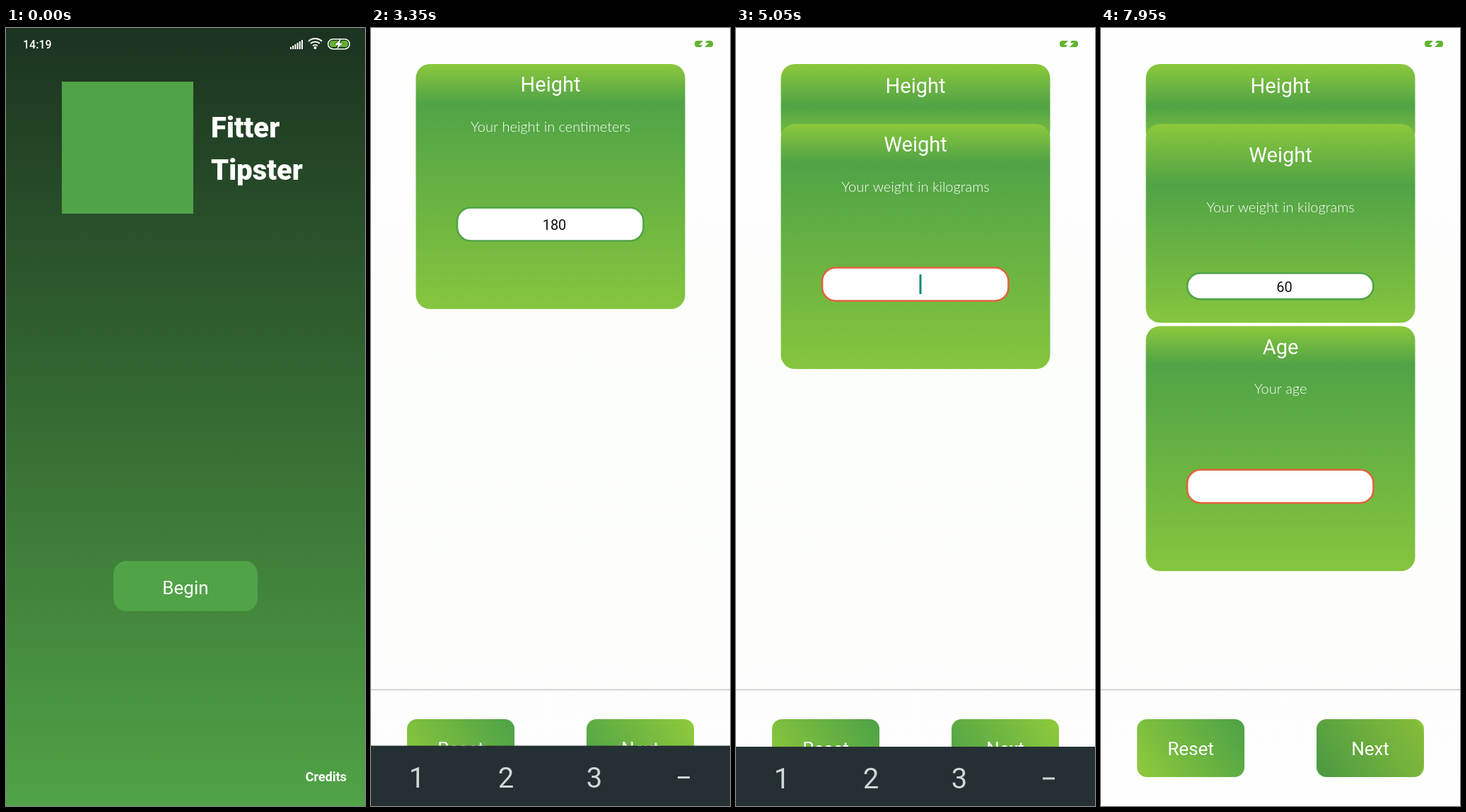
These frames come from a looping animation (508 by 1102 pixels, 8 s). An HTML page with a canvas:

```html
<!DOCTYPE html>
<html lang="en">
<head>
<meta charset="utf-8">
<title>Body data form</title>
<style>
  html, body { margin: 0; width: 508px; height: 1102px; overflow: hidden; background: #fff; }
  canvas { display: block; }
</style>
</head>
<body>
<canvas id="stage" width="508" height="1102"></canvas>
<script>
const W = 508, H = 1102, LOOP = 8000;
const LIME = '#8cc83c', GREEN = '#50a346', ORANGE = '#e0633c', KEY = '#cfd8d6';
const c = document.getElementById('stage').getContext('2d');

const clamp = x => Math.max(0, Math.min(1, x));
const lerp = (a, b, p) => a + (b - a) * p;
const easeOut = x => 1 - (1 - x) ** 2;
const phase = (t, start, length) => easeOut(clamp((t - start) / length));

// Release time and place of each tap
const BEGIN = 230, NEXT_1 = 3865, NEXT_2 = 7760;
const TAPS = [
  [BEGIN, 240, 795], [1680, 256, 280], [2300, 56, 855], [2580, 200, 998],
  [2860, 206, 1060], [3150, 440, 1062], [NEXT_1, 388, 1021], [4900, 256, 366],
  [6150, 318, 928], [6560, 208, 1058], [6950, 440, 1062], [NEXT_2, 374, 1021]
];
// Typed digits: time, column, row
const STROKES = [[2300, 0, 0], [2580, 1, 2], [2860, 1, 3], [6150, 2, 1], [6560, 1, 3]];
const COLS = [65, 191, 316, 442], ROWS = [855, 926, 997, 1068];
const FOCUS = [{ from: 1750, to: 3250 }, { from: 4950, to: 7050 }];

function box(x, y, w, h, r, fill) {
  c.beginPath();
  c.roundRect(x, y, w, h, r);
  c.fillStyle = fill;
  c.fill();
}

function line(points, width, color, close) {
  c.beginPath();
  points.forEach(([x, y]) => c.lineTo(x, y));
  if (close) c.closePath();
  c.lineWidth = width;
  c.strokeStyle = color;
  c.stroke();
}

function shape(points, color) {
  c.beginPath();
  points.forEach(([x, y]) => c.lineTo(x, y));
  c.fillStyle = color;
  c.fill();
}

// y is the middle of the capital letters
function label(s, x, y, size, { font = 'Roboto', weight = 400, color = '#fff', align = 'center' } = {}) {
  c.font = `${weight} ${size}px ${font}, sans-serif`;
  c.textAlign = align;
  c.fillStyle = color;
  c.fillText(s, x, y + size * 0.355);
}

function gradient(x0, y0, x1, y1, ...stops) {
  const g = c.createLinearGradient(x0, y0, x1, y1);
  stops.forEach(([at, color]) => g.addColorStop(at, color));
  return g;
}

function ripple(age, x, y) {
  if (age < 0 || age > 220) return;
  c.save();
  c.clip();
  c.beginPath();
  c.arc(x, y, lerp(20, 90, age / 220), 0, 7);
  c.fillStyle = `rgba(50,60,30,${0.34 * clamp((220 - age) / 120)})`;
  c.fill();
  c.restore();
}

function landing(t) {
  c.fillStyle = gradient(0, 0, 0, H, [0, '#1b3320'], [1, GREEN]);
  c.fillRect(0, 0, W, H);
  c.fillStyle = GREEN;
  c.fillRect(79, 76, 186, 187);
  label('Fitter', 290, 141, 40, { weight: 900, align: 'left' });
  label('Tipster', 290, 201, 40, { weight: 900, align: 'left' });
  box(152, 755, 204, 71, 18, GREEN);
  ripple(t - BEGIN, 254, 791);
  label('Begin', 254, 793, 26);
  label('Credits', 482, 1061, 18, { weight: 700, align: 'right' });
}

function statusBar() {
  label('14:19', 24, 23, 16, { weight: 500, align: 'left' });
  c.fillStyle = '#fff';
  for (let i = 0; i < 6; i++) c.fillRect(402 + i * 3.2, 27 - i * 2, 2, 3 + i * 2);
  c.strokeStyle = '#fff';
  c.lineWidth = 2;
  for (const r of [5, 9.5, 14]) {
    c.beginPath();
    c.arc(437.5, 29, r, -2.32, -0.82);
    c.stroke();
  }
  c.beginPath();
  c.arc(437.5, 28, 2, 0, 7);
  c.fill();
  c.lineWidth = 1.5;
  c.beginPath();
  c.roundRect(455.7, 15.7, 30.6, 14, 7);
  c.stroke();
  c.save();
  c.beginPath();
  c.roundRect(458, 18, 26, 9, 4);
  c.clip();
  shape([[458, 18], [470, 18], [464, 24], [469, 24], [467, 27], [458, 27]], '#62b42f');
  shape([[484, 27], [472, 27], [478, 21], [473, 21], [475, 18], [484, 18]], '#62b42f');
  c.restore();
  shape([[474, 15], [465, 24], [470, 24], [468, 30], [477, 21.5], [472, 21.5]], '#fff');
}

// p folds a card: 0 is open, 1 is tucked under the next one
function card(top, p, title, hint, value, valid, caret) {
  const bump = Math.sin(Math.PI * p);
  const h = lerp(347, 116, p);
  const dark = lerp(55, 60, p) + 38 * bump;
  const mid = top + lerp(227, 105, p) + 48 * bump;
  const fieldH = 47 - 35.6 * p;
  box(63.5, top, 381, h, 20,
    gradient(0, top, 0, top + h, [0, LIME], [clamp(dark / h), GREEN], [1, '#86c53e']));
  c.save();
  c.clip();
  label(title, 254, top + lerp(29, 31, p) + 18.7 * bump, 29);
  label(hint, 254, top + lerp(89, 93, p) + 36 * bump, 20, { font: 'Lato, Carlito', weight: 300 });
  box(122, mid - fieldH / 2, 263.5, fieldH, Math.min(19, fieldH / 2), '#fff');
  c.lineWidth = 2.6;
  c.strokeStyle = valid ? GREEN : ORANGE;
  c.stroke();
  label(value, 259.5, mid + 1, 20, { color: '#111' });
  if (caret) {
    c.fillStyle = '#0f8a75';
    c.fillRect(259.5 + c.measureText(value).width / 2, mid - 14, 3, 28);
  }
  c.restore();
}

function button(x, name, from, to, age) {
  box(x, 979, 152, 82, 14, gradient(x + 10, 1061, x + 142, 979, [0, from], [1, to]));
  ripple(age, x + 74, 1021);
  label(name, x + 76, 1021, 26);
}

function caretOn(t, { from, to }) {
  if (t < from || t > to) return false;
  const last = Math.max(from, ...STROKES.map(s => s[0]).filter(s => s <= t));
  return (t - last) % 1000 < 500;
}

function form(t) {
  c.fillStyle = gradient(0, 0, 0, H, [0, '#fefefe'], [0.5, '#fcfefb'], [1, '#fdfefd']);
  c.fillRect(0, 0, W, H);
  const typed = (s, times) => s.slice(0, times.filter(x => t >= x).length);
  const height = typed('180', [2300, 2580, 2860]);
  const weight = typed('60', [6150, 6560]);
  const fold1 = phase(t, NEXT_1 + 100, 592), fold2 = phase(t, NEXT_2 + 100, 592);
  const top2 = 51 + lerp(366, 85, fold1), top3 = top2 + lerp(366, 85, fold2);

  card(51, fold1, 'Height', 'Your height in centimeters', height, height.length > 1, caretOn(t, FOCUS[0]));
  if (t >= NEXT_1 + 50)
    card(top2, fold2, 'Weight', 'Your weight in kilograms', weight, weight, caretOn(t, FOCUS[1]));
  if (t >= NEXT_2 + 50) card(top3, 0, 'Age', 'Your age', '', false, false);

  c.fillStyle = '#c6cac6';
  c.fillRect(0, 936.5, W, 1.6);
  button(51, 'Reset', LIME, GREEN, -1);
  button(305, 'Next', GREEN, LIME, t - (t < 6000 ? NEXT_1 : NEXT_2));
}

function keyboard(t) {
  const up = phase(t, 1800, 250) - phase(t, 3250, 220) + phase(t, 5012, 250) - phase(t, 7050, 220);
  if (up <= 0) return;
  c.save();
  c.translate(0, 292 * (1 - up));
  c.fillStyle = '#253035';
  c.fillRect(0, 810, W, 292);
  for (const [at, col, row] of STROKES)
    if (t >= at - 90 && t < at) {
      c.fillStyle = '#3b464a';
      c.fillRect(3 + col * 125.5, 819 + row * 71, 125.5, 71);
    }
  c.fillStyle = '#1f282c';
  c.fillRect(0, 1100.5, W, 2);
  [...'123456789,0.'].forEach((s, i) =>
    label(s, COLS[i % 3], ROWS[Math.floor(i / 3)], 40, { color: KEY }));
  line([[434, 855], [451, 855]], 3, KEY);
  line([[429.5, 921], [429.5, 927], [455.5, 927], [455.5, 921]], 2.6, KEY);
  line([[427, 997], [435, 985], [457.5, 985], [457.5, 1009], [435, 1009]], 2.6, KEY, true);
  line([[439, 992], [449, 1002]], 2.6, KEY);
  line([[449, 992], [439, 1002]], 2.6, KEY);
  box(415, 1045, 54.5, 36, 10, '#80cbc4');
  line([[432, 1063], [439, 1070], [453, 1056]], 2.6, '#fff');
  c.restore();
}

function touches(t) {
  for (const [at, x, y] of TAPS) {
    const age = t - at;
    if (age < -100 || age > 130) continue;
    const fade = clamp((130 - age) / 80);
    const r = lerp(11, 18, fade);
    const g = c.createRadialGradient(x, y, 0, x, y, r);
    const tone = (at, a) => g.addColorStop(at, `rgba(222,224,222,${a * fade})`);
    tone(0, 0.7);
    tone(0.7, 0.75);
    tone(0.82, 0.4);
    tone(1, 0);
    c.beginPath();
    c.arc(x, y, r, 0, 7);
    c.fillStyle = g;
    c.fill();
  }
}

function draw() {
  const t = performance.now() % LOOP;
  const enter = phase(t, 450, 350);
  c.save();
  c.translate(-127 * enter, 0);
  if (enter < 1) landing(t);
  c.restore();
  c.save();
  c.translate(W * (1 - enter), 0);
  if (enter > 0) form(t);
  c.restore();
  statusBar();
  keyboard(t);
  touches(t);
  requestAnimationFrame(draw);
}
draw();
</script>
</body>
</html>
```
